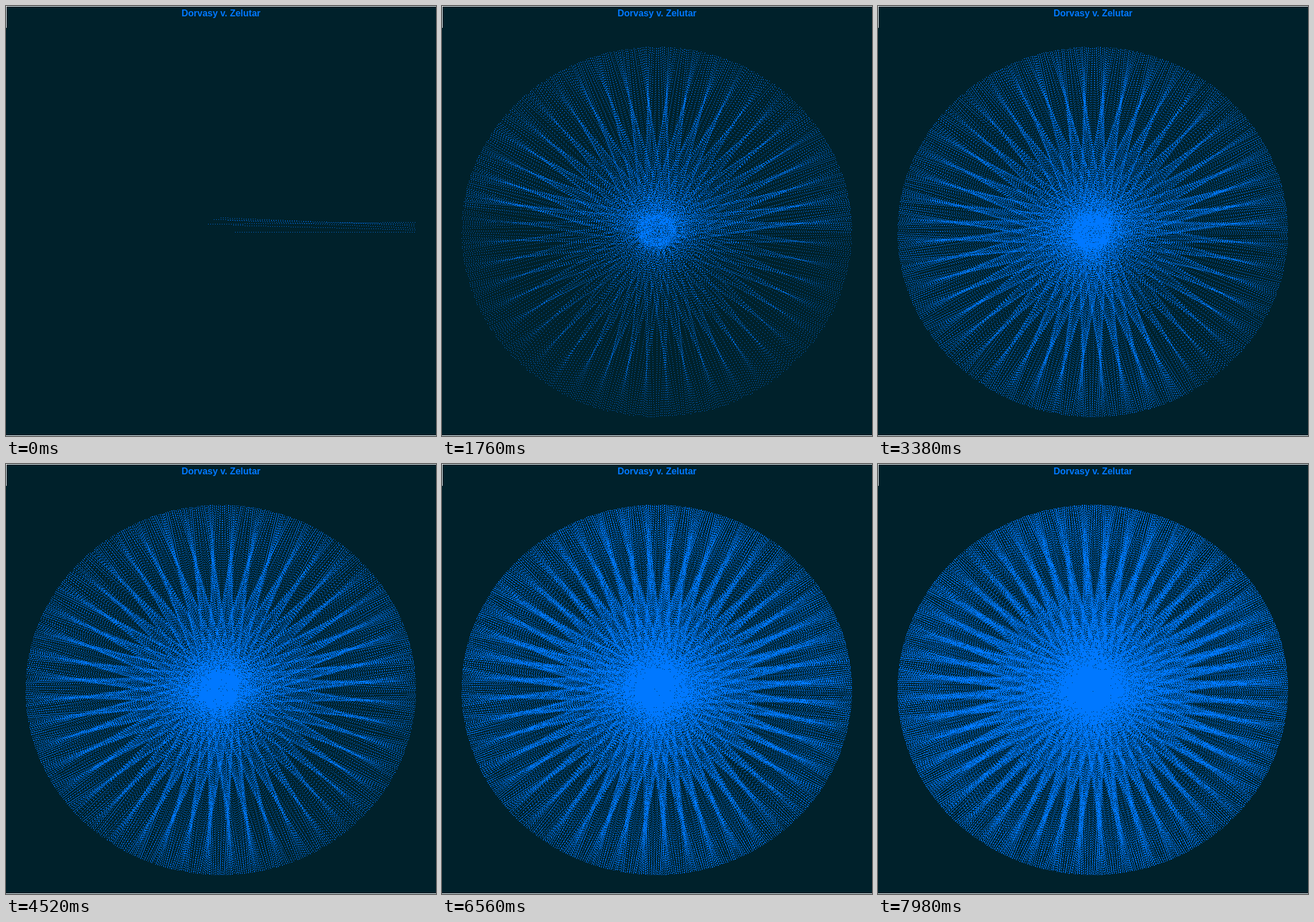
Recreate the animation shown at these times as an HTML page with a canvas. Size 749 by 748 pixels, loop 8000 ms.

```html
<!DOCTYPE html>
<html lang="en">
<head>
<meta charset="utf-8">
<title>Dorvasy v. Zelutar</title>
<style>
  html, body { margin: 0; width: 100%; height: 100%; overflow: hidden; background: #00212b; }
  canvas { position: absolute; left: 0; top: 0; }
  h1 {
    position: absolute; left: 0; top: 4px; width: 749px; margin: 0; text-align: center;
    font: bold 16px/18px "Liberation Sans", Arial, sans-serif; color: #0078ff;
  }
  .edge { position: absolute; left: 0; background: #fff; }
</style>
</head>
<body>
<canvas width="749" height="748"></canvas>
<h1>Dorvasy v. Zelutar</h1>
<div class="edge" style="top:0;width:749px;height:1px"></div>
<div class="edge" style="top:0;width:1px;height:38px"></div>
<div class="edge" style="top:747px;width:749px;height:1px"></div>
<script>
const LOOP = 8000, TICK = 20, LINES_PER_TICK = 10, FIRST_LINES = 6;
const CENTER = { x: 373.6, y: 392.5 }, SQUASH = 321.5 / 339.6;
const OUTER_STEP = 0.60094 * Math.PI / 180;      // radians per line
const SPEED_RATIO = 49.04;                       // just off a whole number, so the spokes drift
const OUTER = { radius: 339.6, step: OUTER_STEP };
const INNER = { radius: 25.5, step: OUTER_STEP * SPEED_RATIO };
const DOT_GAP = 4;

const canvas = document.querySelector('canvas');
const ctx = canvas.getContext('2d');
const image = ctx.createImageData(canvas.width, canvas.height);
const pixels = new Uint32Array(image.data.buffer);
const BLUE = 0xffff7800;                         // ABGR

function planetAt({ radius, step }, i) {
  return {
    x: Math.round(CENTER.x + radius * Math.cos(i * step)),
    y: Math.round(CENTER.y - radius * SQUASH * Math.sin(i * step))
  };
}

// One dot every few pixels along the longer axis.
function dottedLine(a, b) {
  const dx = b.x - a.x, dy = b.y - a.y;
  const length = Math.max(Math.abs(dx), Math.abs(dy));
  for (let k = 0; k <= length; k += DOT_GAP) {
    const x = Math.round(a.x + dx * k / length);
    const y = Math.round(a.y + dy * k / length);
    pixels[y * canvas.width + x] = BLUE;
  }
}

let drawn = 0;
function render() {
  const tick = Math.floor(performance.now() % LOOP / TICK);
  const count = FIRST_LINES + LINES_PER_TICK * tick;
  if (count < drawn) {
    pixels.fill(0);
    drawn = 0;
  }
  if (count > drawn) {
    for (; drawn < count; drawn++) dottedLine(planetAt(INNER, drawn), planetAt(OUTER, drawn));
    ctx.putImageData(image, 0, 0);
  }
  requestAnimationFrame(render);
}
render();
</script>
</body>
</html>
```
